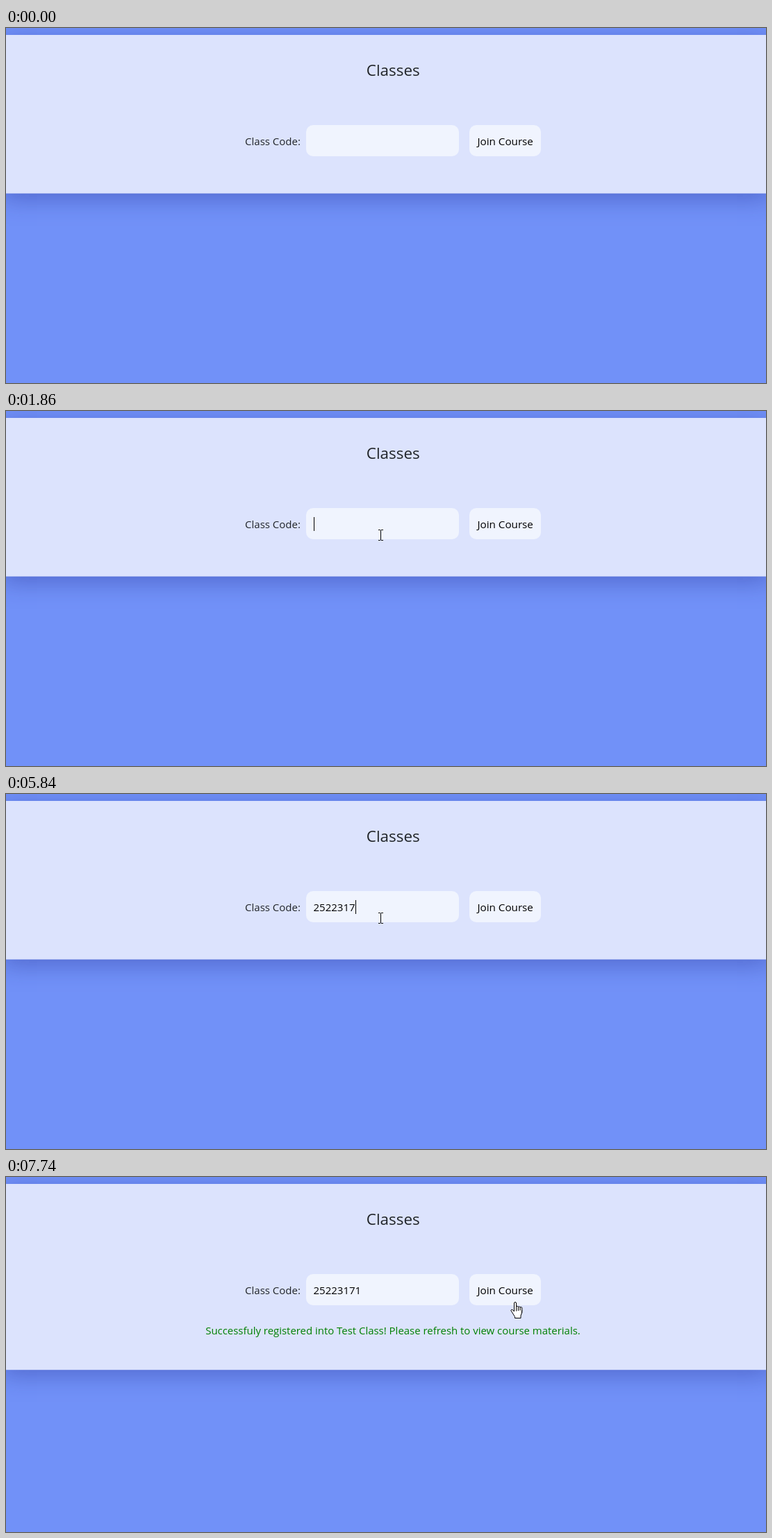
Recreate the animation shown at these times as an HTML page with a canvas. Size 1094x512 px, loop 8000 ms.

```html
<!DOCTYPE html>
<html lang="en">
<head>
<meta charset="utf-8">
<title>Join a class</title>
<style>
  html, body { margin: 0; width: 100%; height: 100%; overflow: hidden; background: #7191f8; }
  canvas { display: block; }
</style>
</head>
<body>
<canvas id="stage" width="1094" height="512"></canvas>
<script>
const ctx = document.getElementById('stage').getContext('2d');
const LOOP = 8000;
const STEP = 80;
const ENTER = 140, ARRIVE = 540, FOCUS = 720, SETTLE = 1320;
const LEAVE = 6700, REACH = 7020, BLUR = 7490, REGISTERED = 7740;
const BLINK = 540;
const CODE = '25223171';
const FIELD = { x: 432, y: 140, w: 220, h: 45 };
const BUTTON = { x: 667, y: 140, w: 103, h: 45 };

const progress = (t, from, to) => Math.min(1, Math.max(0, (t - from) / (to - from)));
const smooth = p => p * p * (3 - 2 * p);
const inside = (box, x, y) =>
  x >= box.x && x < box.x + box.w && y >= box.y && y < box.y + box.h;

// An even typing pace that hurries at first and then hesitates.
const keyTime = i => 2800 + 480 * i - 200 * Math.sin(2 * Math.PI * (i / 7) ** 0.55);
const KEY_TIMES = [...CODE].map((_, i) => keyTime(i));

function write(text, x, baseline, size, color, align = 'center') {
  ctx.font = `${size}px "Open Sans", "Noto Sans", sans-serif`;
  ctx.textAlign = align;
  ctx.fillStyle = color;
  ctx.fillText(text, x, baseline);
}

function panel(box) {
  ctx.fillStyle = '#f0f4fe';
  ctx.beginPath();
  ctx.roundRect(box.x, box.y, box.w, box.h, 10);
  ctx.fill();
}

function drawCard(bottom) {
  ctx.save();
  ctx.shadowColor = 'rgba(31, 38, 135, 0.37)';
  ctx.shadowBlur = 32;
  ctx.shadowOffsetY = 8;
  ctx.fillStyle = '#dce3fd';
  ctx.fillRect(-6, 10, 1106, bottom - 10);
  ctx.restore();
}

function outline(path) {
  ctx.fillStyle = '#fff';
  ctx.strokeStyle = '#000';
  ctx.lineWidth = 1;
  ctx.lineJoin = 'round';
  ctx.fill(path);
  ctx.stroke(path);
}

const ARROW = new Path2D('M.5 .8V16.5L4.2 13L6.7 18.5L9 17.5L6.6 12H11.5Z');
const PALM = new Path2D(
  'M-1.5 13L-3.5 10.7Q-5.5 9.5 -6.3 11.3L-.5 20.5V22.5H8V19Q9.7 16 9.7 11');

function drawHand() {
  for (let i = 3; i >= 0; i--) {
    const top = i ? 4.7 + 0.6 * i : -0.5;
    const finger = new Path2D();
    finger.roundRect(-1.5 + 2.75 * i, top, 3, 16 - top, 1.5);
    outline(finger);
  }
  outline(PALM);
}

function drawIBeam() {
  ctx.fillStyle = '#000';
  for (const y of [-8, 7]) {
    ctx.fillRect(-3, y, 3, 1);
    ctx.fillRect(1, y, 3, 1);
  }
  ctx.fillRect(0, -7, 1, 14);
}

// Swoops into the field, drifts there, then slides over to the button.
function pointerAt(time) {
  const t = ENTER + STEP * Math.floor((time - ENTER) / STEP);
  const left = 1 - progress(t, ENTER, ARRIVE);
  const drift = progress(t, ARRIVE, SETTLE);
  const slide = smooth(progress(t, LEAVE, REACH));
  return {
    x: Math.round(531 + 240 * left ** 3 + 8 * drift + 194 * slide),
    y: Math.round(174 + 289 * left ** 1.1 + 5 * drift
      - 18 * Math.sin(Math.PI * Math.sqrt(drift)) + 2 * slide)
  };
}

function drawPointer(t) {
  if (t < ENTER) return;
  const { x, y } = pointerAt(t);
  ctx.save();
  ctx.translate(x, y);
  if (inside(FIELD, x, y)) drawIBeam();
  else if (inside(BUTTON, x, y)) drawHand();
  else outline(ARROW);
  ctx.restore();
}

// A key press shows the caret; the free-running blink clock flips it.
function caretVisible(t, typed) {
  if (t < FOCUS || t >= BLUR) return false;
  const flips = time => Math.floor((time - FOCUS) / BLINK);
  const shownAt = typed ? KEY_TIMES[typed - 1] : FOCUS;
  return (flips(t) - flips(shownAt)) % 2 === 0;
}

function drawField(t) {
  const typed = KEY_TIMES.filter(time => time <= t).length;
  panel(FIELD);
  write(CODE.slice(0, typed), 442.5, 169, 15, '#000', 'left');
  if (caretVisible(t, typed)) {
    ctx.fillStyle = '#000';
    ctx.fillRect(Math.floor(443.3 + 8.57 * typed), 153, 1, 20);
  }
}

function draw(t) {
  const registered = t >= REGISTERED;
  ctx.fillStyle = '#7191f8';
  ctx.fillRect(0, 0, 1094, 512);
  drawCard(registered ? 278.2 : 238.6);
  write('Classes', 557.2, 69, 22.4, '#212529');
  write('Class Code:', 384, 169, 15, '#212529');
  drawField(t);
  panel(BUTTON);
  write('Join Course', 718.7, 169, 15.2, '#000');
  if (registered) {
    write('Successfuly registered into Test Class! Please refresh to view course materials.',
      557, 227, 14.95, '#008000');
  }
  drawPointer(t);
}

function tick() {
  draw(performance.now() % LOOP);
  requestAnimationFrame(tick);
}
tick();
</script>
</body>
</html>
```
